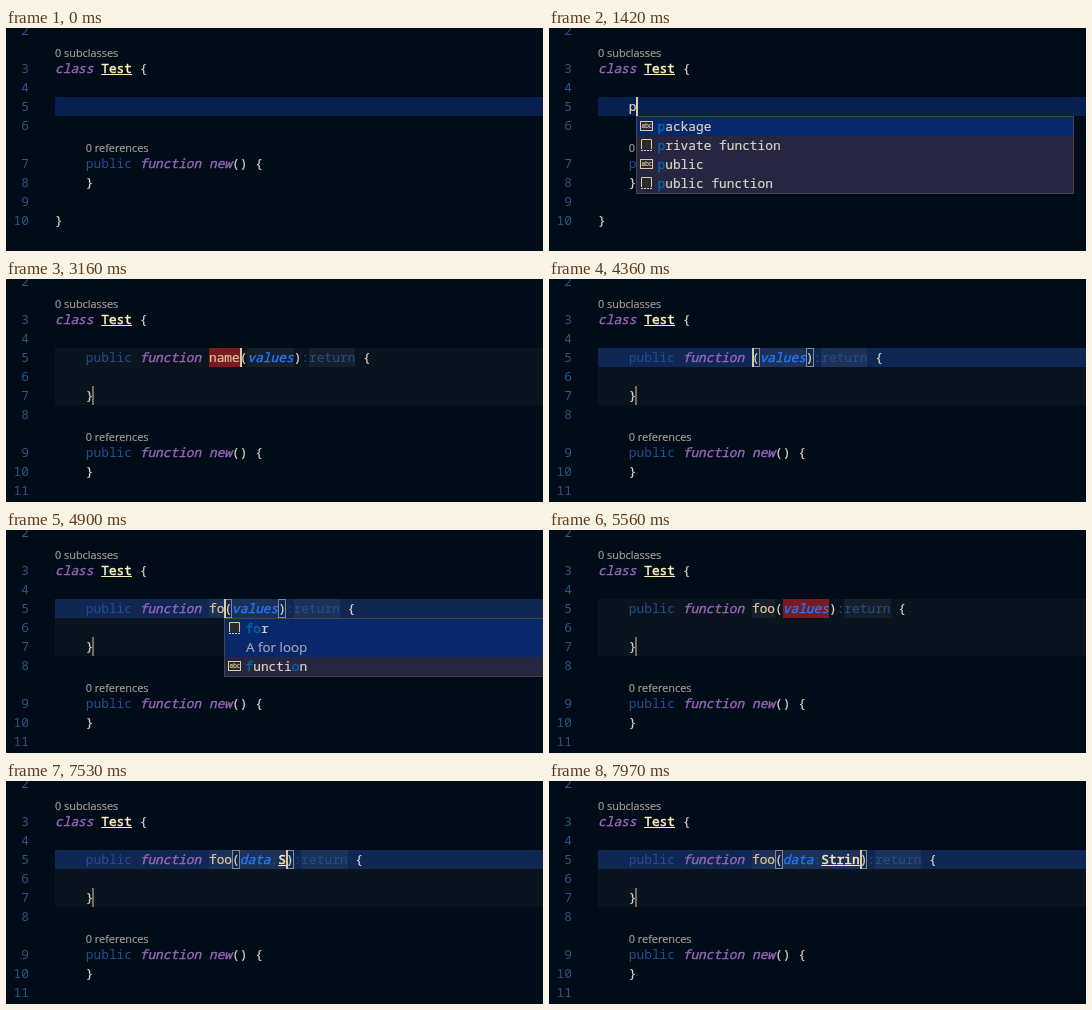
An HTML page for the animation above (8000 ms loop, 537 px wide and 223 px high).

```html
<!DOCTYPE html>
<html lang="en">
<head>
<meta charset="utf-8">
<title>Editor snippet</title>
<style>
  html, body { margin: 0; width: 100%; height: 100%; overflow: hidden; background: #000c18; }
  #stage {
    position: relative; width: 537px; height: 223px; overflow: hidden;
    font: 12.83px/19px "Noto Sans Mono", "DejaVu Sans Mono", monospace;
    color: #d8d4c6; white-space: pre; -webkit-text-stroke: .2px;
  }
  #stage div, #stage svg { position: absolute; }
  .row { left: 49px; height: 19px; }
  .row span { display: inline-block; height: 19px; vertical-align: top; }
  .num { left: 0; width: 23px; text-align: right; color: #2c5580; -webkit-text-stroke: 0; }
  .lens { font: 10.9px/19px "Open Sans", "Noto Sans", sans-serif; color: #a39c95; }
  .bar { left: 49px; right: 0; }
  .key { color: #224f92; -webkit-text-stroke: 0; }
  .type { color: #9966b8; font-style: italic; -webkit-text-stroke: .35px; }
  .cls { color: #ffeebb; text-decoration: underline; -webkit-text-stroke: .5px; }
  .fn { color: #e2c698; }
  .arg { color: #2277ff; font-style: italic; -webkit-text-stroke: .35px; }
  .hole { background: rgba(124, 124, 124, .11); }
  .sel { background: #781b22; }
  .match { box-shadow: inset 0 0 0 1px #888; }
  .caret { width: 2px; height: 19px; background: #ddc9a0; }
  .stop { width: 2px; height: 19px; background: #766c60; }
  .popup { box-sizing: border-box; width: 438px; top: 88px; border: 1px solid #454545; background: #262641; }
  .item { left: 0; right: 0; }
  .item.on { background: #08286b; }
  .item div { left: 20.5px; top: 0; }
  .item svg { left: 2px; top: 1px; }
  .item b { color: #0066aa; font-weight: normal; -webkit-text-stroke: .4px; }
  .item .doc, .item .from { font: 13.4px/19px "Open Sans", "Noto Sans", sans-serif; color: #a2a6b6; }
  .item .doc { left: 21px; top: 19px; }
  .item .from { left: 359px; font-size: 12.6px; }
  .item .info {
    left: 413px; top: 23px; width: 11px; height: 11px; border-radius: 50%;
    background: #1b80b2; color: #dde6ee; text-align: center;
    font: bold 9px/11px "Noto Serif", serif; -webkit-text-stroke: 0;
  }
</style>
</head>
<body>
<div id="stage"></div>
<script>
const LOOP = 8000, CHAR = 7.697, LEFT = 49, ROW = 19, EDIT = 69;
const stage = document.getElementById('stage');

const span = (cls, text) => `<span class="${cls}">${text}</span>`;
const box = (cls, style, body = '') => `<div class="${cls}" style="${style}">${body}</div>`;
const colX = col => Math.round(LEFT + col * CHAR);
const code = (y, html) => box('row', `top:${y}px`, html);
const lens = (y, col, text) => box('lens', `top:${y + 3}px;left:${LEFT + col * CHAR}px`, text);
const num = (y, n) => box('num', `top:${y}px`, n);

const ICONS = {
  word: `<svg width="16" height="16" fill="#2b2a2c" stroke="#d6cba4">
    <rect x="1.5" y="3.5" width="12" height="9"/>
    <text x="2.4" y="10.3" font-family="Open Sans, sans-serif" font-size="6.4" fill="#d6cba4" stroke-width=".2">abc</text></svg>`,
  snippet: `<svg width="16" height="16" fill="#2b2a2c" stroke="#d6cba4">
    <path d="M2.5 12V2.5H12.5V12"/><path d="M2 13.5H14" stroke-dasharray="2 1"/></svg>`
};

// Square brackets in a label mark the matched letters.
const word = label => ({ icon: 'word', label });
const snip = (label, doc, from) => ({ icon: 'snippet', label, doc, from });
const popup = (col, active, ...items) => ({ col, active, items });

function drawPopup({ col, active, items }) {
  let y = 0, body = '';
  items.forEach((item, i) => {
    const on = i === active, open = on && item.doc;
    const h = open ? 2 * ROW : ROW;
    let inner = ICONS[item.icon] + box('', '', item.label.replace(/\[(\w+)\]/g, '<b>$1</b>'));
    if (open) {
      inner += box('doc', '', item.doc);
      if (item.from) inner += box('from', '', item.from) + box('info', '', 'i');
    }
    body += box(on ? 'item on' : 'item', `top:${y}px;height:${h}px`, inner);
    y += h;
  });
  return box('popup', `left:${colX(col)}px;height:${y + 2}px`, body);
}

// Before the snippet: plain typing on line 5.
const typed = (text, list) => ({ line: '    ' + text, caret: text ? 4 + text.length : null, lit: true, list });

// Inside the snippet: name, argument and type fields.
function snippet(name, arg, { type, pick, match, caret, list, blink }) {
  const field = (id, cls, text) => text && span(cls + (pick === id ? ' sel' : ' hole'), text);
  const par = c => span(match ? 'match' : '', c);
  const tail = type === undefined ? '' : span('key hole', ':') + (type && span('cls hole', type));
  const line = '    ' + span('key', 'public') + ' ' + span('type', 'function') + ' ' +
    field('name', 'fn', name) + par('(') + field('arg', 'arg', arg) + tail + par(')') +
    span('key', ':') + span('key hole', 'return') + ' {';
  return { line, caret: blink ? null : caret, lit: !pick, list, inside: true };
}
const naming = (name, list) => snippet(name, 'values', { match: true, caret: 20 + name.length, list });
const arguing = (arg, list, type) =>
  snippet('foo', arg, { match: true, type, caret: 24 + arg.length + (type === undefined ? 0 : 1 + type.length), list });

const DOC = 'A public function';
const pubs = (hit, rest, col, active = 0) => popup(col, active,
  word(`[${hit}]${rest}`), snip(`[${hit}]${rest} function`, DOC, 'hxmanager'));
const loops = (a, b, col) => popup(col, 0, snip(a, 'A for loop'), word(b));

const STEPS = [
  [0, typed('')],
  [1420, typed('p', popup(5, 0, word('[p]ackage'), snip('[p]rivate function'), word('[p]ublic'), snip('[p]ublic function')))],
  [1530, typed('pu', pubs('pu', 'blic', 6))],
  [1640, typed('pub', pubs('pub', 'lic', 7))],
  [1740, typed('publ', pubs('publ', 'ic', 8))],
  [2400, typed('publ', pubs('publ', 'ic', 8, 1))],
  [2610, snippet('name', 'values', { pick: 'name', caret: 24 })],
  [4360, naming('')],
  [4790, naming('f', loops('[f]or', '[f]unction', 21))],
  [4900, naming('fo', loops('[fo]r', '[f]uncti[o]n', 22))],
  [5020, naming('foo')],
  [5120, snippet('foo', 'values', { pick: 'arg', caret: 30 })],
  [5560, snippet('foo', 'values', { pick: 'arg', caret: 30, blink: true })],
  [6000, arguing('')],
  [6550, arguing('d')],
  [6650, arguing('d', popup(25, 0, word('[d]')))],
  [6760, arguing('da', popup(25, 0, word('[d]')))],
  [6870, arguing('da', popup(26, 0, word('[da]')))],
  [6980, arguing('dat')],
  [7100, arguing('data')],
  [7420, arguing('data', null, '')],
  [7530, arguing('data', null, 'S')],
  [7640, arguing('data', popup(30, 0, word('[S]td'), word('[S]tring'), word('[S]tringBuf'), word('[S]tringTools')), 'S')],
  [7860, arguing('data', popup(32, 0, word('[Str]ing'), word('[Str]ingBuf'), word('[Str]ingTools')), 'Str')],
  [7970, arguing('data', null, 'Strin')]
];

function draw({ line, caret, lit, list, inside }) {
  const at = n => EDIT + n * ROW;
  const base = inside ? 4 : 2; // row of the lens above the constructor
  let out = '';
  if (inside) out += box('bar', `top:${EDIT}px;height:${3 * ROW}px;background:#0a141f`);
  if (lit) out += box('bar', `top:${EDIT}px;height:${ROW}px;background:${inside ? '#102753' : '#082050'}`);

  // The class closes on the last line, four rows below the lens.
  out += num(at(-4), 2);
  for (let r = -2, n = 3; r <= base + 4; r++) if (r !== base) out += num(at(r), n++);

  out += lens(at(-3), 0, '0 subclasses');
  out += code(at(-2), span('type', 'class') + ' ' + span('cls', 'Test') + ' {');
  out += code(EDIT, line);
  if (inside) {
    out += code(at(2), '    }');
    out += box('stop', `top:${at(2)}px;left:${colX(5) - 1}px`);
  }
  out += lens(at(base), 4, '0 references');
  out += code(at(base + 1), '    ' + span('key', 'public') + ' ' + span('type', 'function new') + '() {');
  out += code(at(base + 2), '    }');
  out += code(at(base + 4), '}');

  if (caret !== null) out += box('caret', `top:${EDIT}px;left:${colX(caret)}px`);
  if (list) out += drawPopup(list);
  stage.innerHTML = out;
}

let shown = null;
function tick() {
  const t = performance.now() % LOOP;
  const step = STEPS.findLast(s => s[0] <= t);
  if (step !== shown) draw((shown = step)[1]);
  requestAnimationFrame(tick);
}
tick();
</script>
</body>
</html>
```
